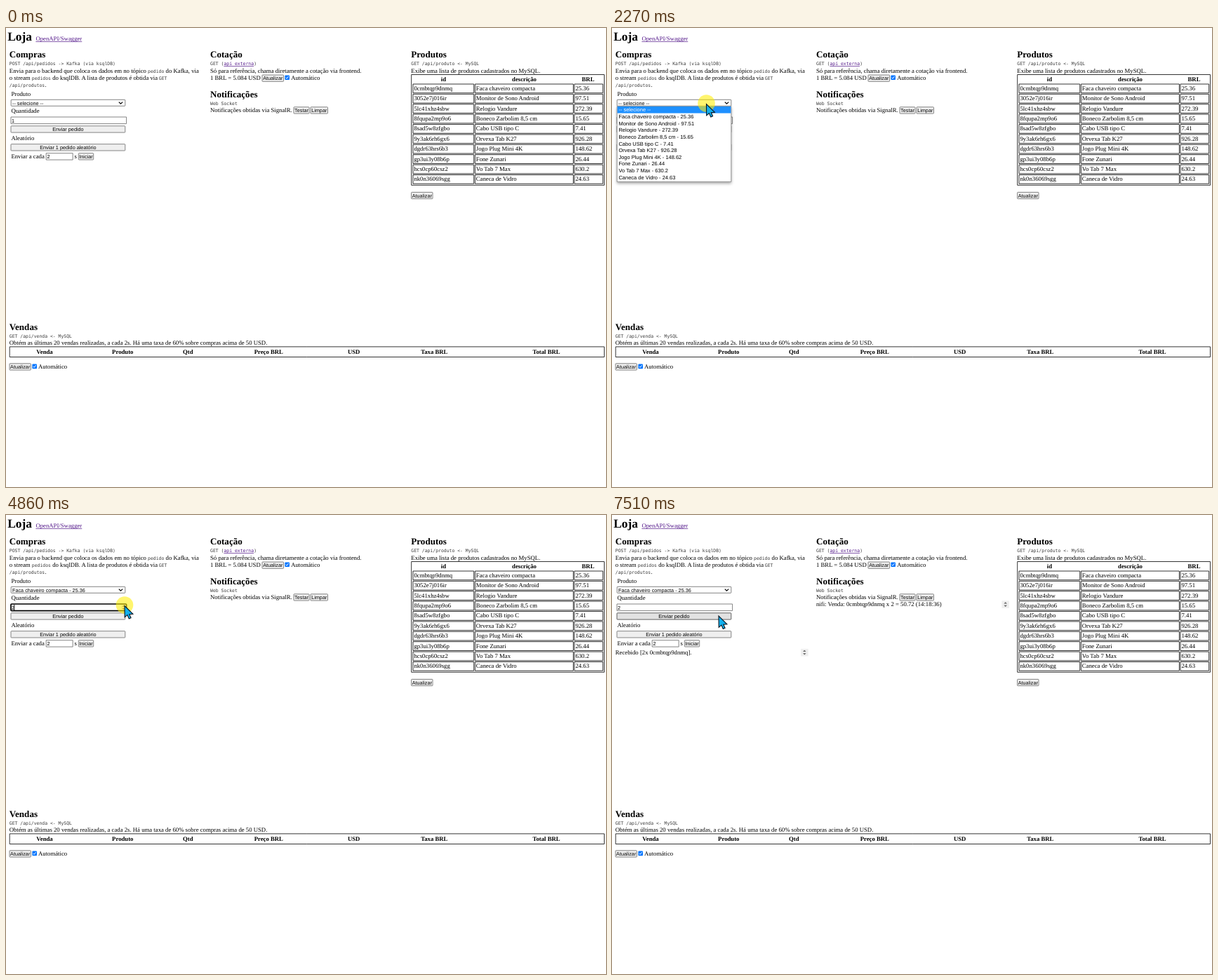
Write an HTML page with a canvas that moves like this. It is 855 px wide and 655 px high and loops after 8 s.

```html
<!DOCTYPE html>
<html lang="pt-BR">
<head>
<meta charset="utf-8">
<title>Loja</title>
<style>
html, body { margin: 0; width: 100%; height: 100%; overflow: hidden; background: #fff; }
canvas { display: block; width: 855px; height: 655px; text-rendering: geometricPrecision; }
</style>
</head>
<body>
<canvas id="stage" width="855" height="655"></canvas>
<script>
const ctx = document.getElementById('stage').getContext('2d');
ctx.textRendering = 'geometricPrecision';

const LOOP = 8000;
const SERIF = '"Liberation Serif", serif';
const SANS = '"Liberation Sans", sans-serif';
const FONT = {
  h1: `bold 17.44px ${SERIF}`,
  h2: `bold 13.08px ${SERIF}`,
  body: `8.72px ${SERIF}`,
  bold: `bold 8.72px ${SERIF}`,
  code: '6.45px "DejaVu Sans Mono", monospace',
  ui: `7.27px ${SANS}`,
  list: `7.49px ${SANS}`
};
const LINK = '#551a8b';
const GREY = '#767676';

const products = [
  ['0cmbtqp9dnmq', 'Faca chaveiro compacta', '25.36'],
  ['3052e7j016ir', 'Monitor de Sono Android', '97.51'],
  ['5lc41xhz4sbw', 'Relogio Vandure', '272.39'],
  ['8fqupa2mp9o6', 'Boneco Zarbolim 8,5 cm', '15.65'],
  ['8sad5w8zfgbo', 'Cabo USB tipo C', '7.41'],
  ['9y3ak6rh6gx6', 'Orvexa Tab K27', '926.28'],
  ['dgdr63hrs6b3', 'Jogo Plug Mini 4K', '148.62'],
  ['gp3ui3y08b6p', 'Fone Zunari', '26.44'],
  ['hcs0cp60csz2', 'Vo Tab 7 Max', '630.2'],
  ['nk0n36069sgg', 'Caneca de Vidro', '24.63']
];
const EMPTY = '-- selecione --';
const options = [EMPTY, ...products.map(p => `${p[1]} - ${p[2]}`)];

// Pointer moves: start, end, number of steps, way points
const moves = [
  [490, 750, 4, [[776, 326], [640, 322], [415, 285], [307, 258]]],
  [930, 1680, 10, [[290, 250], [190, 205], [139, 123.5], [134.5, 112]]],
  [1760, 1930, 3, [[134.3, 110.5], [134, 108]]],
  [2690, 3180, 7, [[134, 110], [132, 125]]],
  [4100, 4530, 6, [[136, 122], [150, 118.5], [162, 124], [168.5, 129]]],
  [5190, 5600, 6, [[168, 131], [160, 140], [151.5, 143.5]]]
];
const clicks = [[2270, 2350], [3510, 3610], [4860, 4930], [6190, 6270]];

const within = (t, from, to) => t >= from && t < to;

function along(points, p) {
  const s = p * (points.length - 1);
  const i = Math.min(Math.floor(s), points.length - 2);
  return points[i].map((v, axis) => v + (points[i + 1][axis] - v) * (s - i));
}

function pointerAt(t) {
  const move = moves.filter(m => t >= m[0]).pop();
  if (!move) return null;
  const [start, end, steps, points] = move;
  const k = Math.floor((t - start) / (end - start) * (steps - 1) + 0.001);
  return along(points, Math.min(1, k / (steps - 1)));
}

function text(str, x, y, font = 'body', color = '#000', align = 'left') {
  ctx.font = FONT[font];
  ctx.fillStyle = color;
  ctx.textAlign = align;
  ctx.fillText(str, x, y);
}

const code = (str, x, y) => text(str, x, y, 'code', '#3c3c3c');

function link(str, x, y, font) {
  text(str, x, y, font, LINK);
  ctx.fillRect(x, y + 1, ctx.measureText(str).width, 0.7);
}

function rect(x, y, w, h, fill, color, line = 0.8, radius = 0) {
  ctx.beginPath();
  ctx.roundRect(x, y, w, h, radius);
  if (fill) {
    ctx.fillStyle = fill;
    ctx.fill();
  }
  ctx.strokeStyle = color;
  ctx.lineWidth = line;
  ctx.stroke();
}

function polygon(points, fill) {
  ctx.beginPath();
  points.forEach(([x, y]) => ctx.lineTo(x, y));
  ctx.closePath();
  ctx.fillStyle = fill;
  ctx.fill();
}

function button(label, x, y, w, mouse) {
  const h = 9.3;
  const hover = mouse && mouse[0] >= x && mouse[0] <= x + w && mouse[1] >= y && mouse[1] <= y + h;
  rect(x, y, w, h, hover ? '#e2e2e2' : '#efefef', hover ? '#4f4f4f' : GREY, 0.9, 0.7);
  text(label, x + w / 2, y + 7.2, 'ui', '#000', 'center');
}

function checkbox(x, y) {
  ctx.fillStyle = '#0075ff';
  ctx.beginPath();
  ctx.roundRect(x, y, 6.6, 6.6, 1);
  ctx.fill();
  ctx.beginPath();
  ctx.moveTo(x + 1.4, y + 3.4);
  ctx.lineTo(x + 2.7, y + 4.8);
  ctx.lineTo(x + 5.2, y + 1.6);
  ctx.strokeStyle = '#fff';
  ctx.lineWidth = 1;
  ctx.stroke();
}

function spinner(x, y, size, arrow) {
  ctx.fillStyle = '#efefef';
  ctx.fillRect(x - size / 2, y - size / 2, size, size);
  for (const d of [-1, 1]) {
    polygon([[x - arrow, y + d * 1.1], [x + arrow, y + d * 1.1], [x, y + d * (1.1 + arrow)]], '#606060');
  }
}

function drawPage(mouse) {
  text('Loja', 2.2, 18, 'h1');
  link('OpenAPI/Swagger', 42.4, 18);

  text('Compras', 4.8, 42, 'h2');
  code('POST /api/pedidos -> Kafka (via ksqlDB)', 4.8, 53);
  text('Envia para o backend que coloca os dados em no tópico', 4.8, 64);
  code('pedido', 202, 64);
  text('do Kafka, via', 227.6, 64);
  text('o stream', 4.8, 74);
  code('pedidos', 36.8, 74);
  text('do ksqlDB. A lista de produtos é obtida via', 66.2, 74);
  code('GET', 217.8, 74);
  code('/api/produtos', 4.8, 84);
  text('.', 55.4, 84);

  text('Cotação', 291, 42, 'h2');
  code('GET (', 291, 53);
  link('api externa', 310.4, 53, 'code');
  code(')', 353.2, 53);
  text('Só para referência, chama diretamente a cotação via frontend.', 291, 64);
  text('1 BRL = 5.084 USD', 291, 74);
  button('Atualizar', 365, 67, 30.6, mouse);
  checkbox(397.4, 67.4);
  text('Automático', 406.2, 74);
  text('Notificações', 291, 99, 'h2');
  code('Web Socket', 291, 110);
  text('Notificações obtidas via SignalR.', 291, 120);
  button('Testar', 410, 112.8, 22, mouse);
  button('Limpar', 434, 112.8, 24.5, mouse);

  text('Produtos', 577.3, 42, 'h2');
  code('GET /api/produto <- MySQL', 577.3, 53);
  text('Exibe uma lista de produtos cadastrados no MySQL.', 577.3, 64);
  rect(577.7, 66.5, 274.8, 157.8, null, '#000');
  [['id', 623.5], ['descrição', 738.5], ['BRL', 829.5]]
    .forEach(([str, x]) => text(str, x, 76, 'bold', '#000', 'center'));
  products.forEach((row, i) => {
    const y = 80 + i * 14.39;
    [[580, 86.7], [668.4, 140], [810, 40.6]].forEach(([x, w], c) => {
      rect(x, y, w, 12.7, null, '#000');
      text(row[c], x + 1.4, y + 8.9);
    });
  });
  button('Atualizar', 577.6, 234.4, 30.4, mouse);

  text('Vendas', 4.8, 431, 'h2');
  code('GET /api/venda <- MySQL', 4.8, 442);
  text('Obtém as últimas 20 vendas realizadas, a cada 2s. Há uma taxa de 60% sobre compras acima de 50 USD.', 4.8, 452);
  rect(5.2, 454.9, 847.3, 14.6, null, '#000');
  [['Venda', 55], ['Produto', 166.3], ['Qtd', 259.3], ['Preço BRL', 374.3],
   ['USD', 495.6], ['Taxa BRL', 610.3], ['Total BRL', 770]]
    .forEach(([str, x]) => text(str, x, 465, 'bold', '#000', 'center'));
  button('Atualizar', 5, 478.8, 30.4, mouse);
  checkbox(37.4, 479.6);
  text('Automático', 46, 486);
}

function drawForm(t, mouse) {
  const focused = within(t, 4860, 6190);
  const overInput = mouse && Math.abs(mouse[1] - 131.7) < 5 && mouse[0] < 172;

  text('Produto', 7.4, 97);
  rect(7.2, 102.3, 162.6, 9, '#fff', GREY, 0.9, 0.7);
  text(t < 3610 ? EMPTY : options[1], 9, 109.5, 'ui');
  ctx.beginPath();
  ctx.moveTo(160.8, 105.6);
  ctx.lineTo(163.5, 108.2);
  ctx.lineTo(166.2, 105.6);
  ctx.strokeStyle = '#000';
  ctx.lineWidth = 1.2;
  ctx.stroke();

  text('Quantidade', 7.4, 121);
  rect(7, 127, 164.6, 9.6, '#fff', focused ? '#000' : GREY, focused ? 1.7 : 0.9, focused ? 1 : 0);
  text(t < 4860 ? '1' : '2', 8.1, 134.5, 'ui');
  if (focused || (overInput && !within(t, 2270, 3610))) spinner(167.3, 131.8, 6.6, 1.8);
  if (focused && !within(t, 5370, 5870)) {
    ctx.fillStyle = '#000';
    ctx.fillRect(11.3, 128, 0.9, 8);
  }

  button('Enviar pedido', 7, 139.8, 162.8, mouse);
  text('Aleatório', 7.4, 160);
  button('Enviar 1 pedido aleatório', 7, 165.7, 162.8, mouse);
  text('Enviar a cada', 7.4, 186);
  rect(57.2, 178.7, 38, 9.4, '#fff', GREY, 0.9);
  text('2', 58.6, 186, 'ui');
  text('s', 97.6, 186);
  button('Iniciar', 103.3, 178.7, 21.4, mouse);
}

function drawList(mouse) {
  ctx.save();
  ctx.shadowColor = 'rgba(0,0,0,.35)';
  ctx.shadowBlur = 4;
  ctx.shadowOffsetY = 2;
  ctx.fillStyle = '#fff';
  ctx.fillRect(7, 111.5, 163, 108);
  ctx.restore();
  rect(7.2, 111.6, 162.6, 107.8, '#fff', GREY, 0.8);
  const active = mouse[1] > 121 ? 1 : 0;
  options.forEach((label, i) => {
    const y = 111.9 + i * 9.66;
    if (i === active) {
      ctx.fillStyle = '#1e90ff';
      ctx.fillRect(7.6, y, 161.8, 9.66);
    }
    text(label, 9.4, y + 7.3, 'list', i === active ? '#fff' : '#000');
  });
}

function drawPointer(t, [x, y]) {
  if (clicks.some(c => within(t, ...c))) {
    ctx.fillStyle = 'rgba(255,238,0,.57)';
    ctx.beginPath();
    ctx.arc(x + 0.5, y - 0.5, 12.3, 0, 2 * Math.PI);
    ctx.fill();
  }
  const arrow = [[0.5, 0.6], [0.7, 16.8], [4.4, 13.6], [6.8, 19], [9.6, 17.8], [7.3, 12.7], [12.4, 12.3]];
  polygon(arrow.map(([dx, dy]) => [x + dx, y + dy]), '#12b0ee');
  ctx.strokeStyle = '#0a1420';
  ctx.lineWidth = 1.1;
  ctx.lineJoin = 'miter';
  ctx.stroke();
}

function draw(t) {
  const mouse = pointerAt(t);
  const open = within(t, 2270, 3610);
  ctx.fillStyle = '#fff';
  ctx.fillRect(0, 0, 855, 655);
  drawPage(mouse);
  drawForm(t, mouse);
  if (t >= 6350) {
    text('Recebido [2x 0cmbtqp9dnmq].', 4.8, 199);
    spinner(274.3, 196.2, 10.6, 2.3);
  }
  if (t >= 7510) {
    text('nifi: Venda: 0cmbtqp9dnmq x 2 = 50.72 (14:18:36)', 291, 130);
    spinner(560.7, 127.7, 10.6, 2.3);
  }
  if (open) drawList(mouse);
  if (mouse) drawPointer(t, mouse);
}

const origin = performance.now();
function tick() {
  draw((performance.now() - origin) % LOOP);
  requestAnimationFrame(tick);
}
tick();
</script>
</body>
</html>
```
